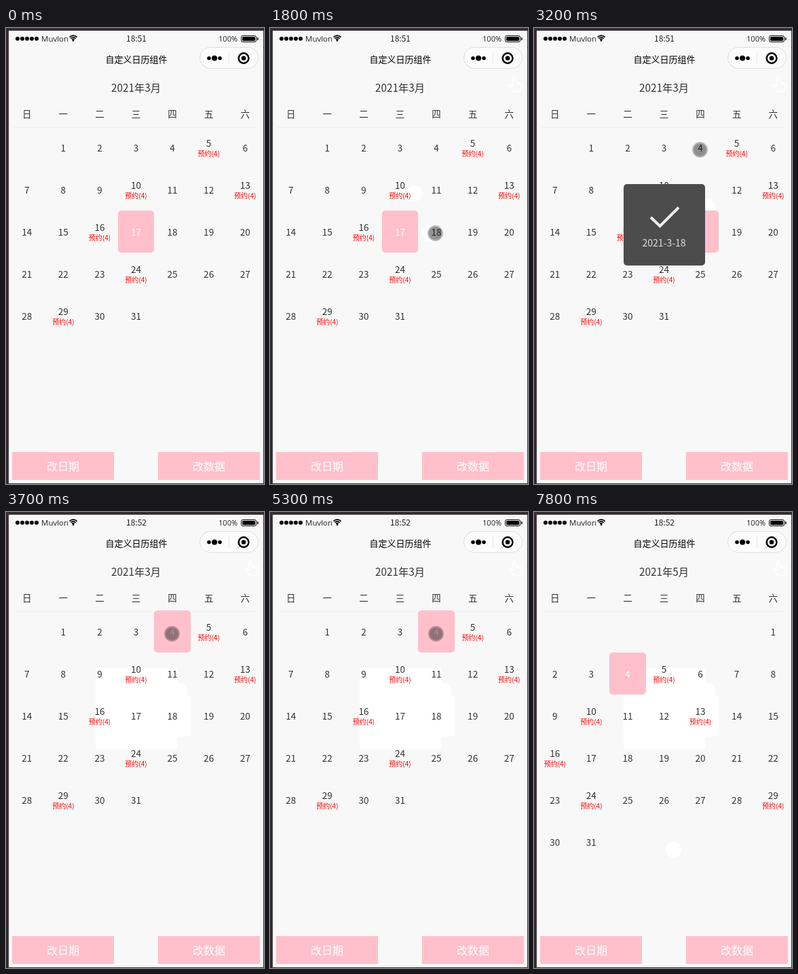
Recreate the animation shown at these times as an HTML page with a canvas. Size 380 by 672 pixels, loop 8000 ms.

```html
<!DOCTYPE html>
<html lang="zh">
<head>
<meta charset="utf-8">
<title>日历组件</title>
<style>
html, body { margin: 0; width: 100%; height: 100%; overflow: hidden; background: #f8f8f8; }
canvas { display: block; }
</style>
</head>
<body>
<canvas id="stage" width="380" height="672"></canvas>
<script>
const c = document.getElementById('stage').getContext('2d');
const LOOP = 8000, PINK = '#ffc0cb', PAGE = '#f8f8f8';
const CJK = '"Noto Sans CJK SC", "Noto Sans CJK", sans-serif';
const LATIN = '"Open Sans", ' + CJK;
const BOOKED = [5, 10, 13, 16, 24, 29];
const COL = 375 / 7, ROW = 62, TOP = 145;

// Touch pointer: [time, x, y]; without a place it is hidden
const POINTER = [
  [0], [400, 213.5, 243.5], [500, 199, 282], [700, 198.5, 285], [1000, 198.5, 288.5],
  [1200, 196, 296], [1300, 193.5, 303.5], [1400],
  [1600, 235.5, 302.5], [1700, 239.5, 302.5], [1800, 243.5, 302.5],
  [2000, 245.5, 309.5], [2600, 248, 298], [2700, 252, 280], [2800, 255.5, 263.5], [2900],
  [3200, 244.5, 179.5], [5500], [5700, 205.5, 497.5], [5800],
  [6100, 84.5, 642.5], [6200, 83.5, 644.5], [7800]
];

function text(s, x, y, size, color, font = CJK, align = 'center', weight = 400) {
  c.font = `${weight} ${size}px ${font}`;
  c.textAlign = align;
  c.fillStyle = color;
  c.fillText(s, x, y);
}

function rect(x, y, w, h, color, r = 0) {
  c.fillStyle = color;
  c.beginPath();
  c.roundRect(x, y, w, h, r);
  c.fill();
}

function cell(i, y, color) {
  const left = Math.round(4 + i * COL), right = Math.round(4 + (i + 1) * COL);
  rect(left, y, right - left, ROW, color, 5);
}

function disc(x, y, r, color) {
  c.fillStyle = color;
  c.beginPath();
  c.arc(x, y, r, 0, 7);
  c.fill();
}

function arc(x, y, r, color, width, from = 0, to = 2 * Math.PI) {
  c.strokeStyle = color;
  c.lineWidth = width;
  c.beginPath();
  c.arc(x, y, r, from, to);
  c.stroke();
}

function header(t) {
  for (let i = 0; i < 5; i++) disc(17 + i * 7, 15.7, 3, '#000');
  text('Muvlon', 52, 19.5, 11.5, '#222', LATIN, 'left');
  for (const r of [2.6, 5.2, 7.8]) arc(99, 19, r, '#000', 1.7, -2.36, -0.78);
  disc(99, 18.6, 1.3, '#000');
  text(t < 3400 ? '18:51' : '18:52', 192, 19.5, 12, '#222');
  text('100%', 341, 20, 11, '#222', LATIN, 'right');
  c.strokeStyle = '#000';
  c.lineWidth = 1;
  c.beginPath();
  c.roundRect(346.5, 11.5, 22, 9, 2);
  c.stroke();
  rect(348, 13, 19, 6, '#000', 1);
  rect(370, 14, 1.5, 4, '#000');

  text('自定义日历组件', 192, 51, 13, '#000');
  rect(285.5, 28.5, 86, 31, 'rgba(255,255,255,.6)', 15.5);
  c.strokeStyle = '#dedede';
  c.lineWidth = 1;
  c.stroke();
  disc(299, 44.5, 2.8, '#000');
  disc(307, 44.5, 4, '#000');
  disc(315, 44.5, 2.8, '#000');
  rect(328, 35, 1, 18, '#e8e8e8');
  arc(350, 44.5, 7.4, '#000', 2.5);
  disc(350, 44.5, 3.3, '#000');
}

// White patches left behind after things vanish
function patches(t) {
  if (t >= 500) disc(213.5, 243.5, 11.5, '#fff');
  if (t >= 1700) disc(235.5, 302.5, 11.5, '#fff');
  if (t >= 2900) disc(255.5, 263.5, 11.5, '#fff');
  if (t >= 3400) rect(132, 230, 120, 120, '#fff', 1);
  if (t >= 3700) cell(4, 269, '#fff');
  if (t >= 5800) disc(205.5, 497.5, 11.5, '#fff');
}

function hand(t) {
  if (t < 300) return;
  c.beginPath();
  c.moveTo(358, 87);
  c.lineTo(358, 72);
  c.quadraticCurveTo(359.5, 69, 361.5, 72);
  c.lineTo(361.5, 79);
  c.lineTo(368, 80.5);
  c.quadraticCurveTo(370, 81, 370, 83);
  c.lineTo(370, 88);
  c.lineTo(368, 94);
  c.lineTo(359, 94);
  c.lineTo(353, 85);
  c.quadraticCurveTo(353, 82, 358, 86);
  c.moveTo(364.5, 80);
  c.lineTo(364.5, 84);
  c.moveTo(367.5, 81);
  c.lineTo(367.5, 84);
  const live = t < 400;
  c.fillStyle = live ? '#fff' : PAGE;
  c.fill();
  c.strokeStyle = live ? '#000' : '#fff';
  c.lineWidth = live ? 1 : 1.7;
  c.stroke();
}

function calendar(t) {
  const may = t >= 7100;
  const first = may ? 6 : 1;
  const picked = t < 2000 ? 17 : t < 3700 ? 18 : 4;
  text(`2021年${may ? 5 : 3}月`, 191.5, 94, 15.3, '#333');
  [...'日一二三四五六'].forEach((s, i) => text(s, 4 + (i + .5) * COL, 132, 13.5, '#333'));
  rect(9, 146, 360, 1, '#f0f0f0');
  for (let day = 1; day <= 31; day++) {
    const i = day - 1 + first, col = i % 7;
    const x = 4 + (col + .5) * COL;
    const y = TOP + Math.floor(i / 7) * ROW;
    const on = day === picked, booked = BOOKED.includes(day);
    if (on) cell(col, y, PINK);
    text(day, x, y + (booked ? 30 : 37), 13.6, on ? '#fff' : '#333');
    if (booked) text('预约(4)', x, y + 44, 10, '#f00');
  }
}

function button(x, label) {
  rect(x, 625, 150, 41, PINK);
  text(label, x + 75, 652, 16, '#fff');
}

function toast(t) {
  const second = t >= 3800;
  if (!(t >= 2000 && t < 3400) && !(second && t < 5300)) return;
  c.globalAlpha = second && t < 3900 ? .5 : 1;
  rect(132, 230, 120, 120, '#4c4c4c', 5);
  c.strokeStyle = '#eee';
  c.lineWidth = 4;
  c.beginPath();
  c.moveTo(172, 279);
  c.lineTo(185.5, 292);
  c.lineTo(213, 264.5);
  c.stroke();
  text(second ? '2021-3-4' : '2021-3-18', 191.5, 322, 14, '#dedede', CJK, 'center', 500);
  c.globalAlpha = 1;
}

function pointer(t) {
  const [, x, y] = POINTER.filter(p => p[0] <= t).pop();
  if (x === undefined) return;
  disc(x, y, 9.5, 'rgba(20,20,20,.46)');
  arc(x, y, 10.4, 'rgba(20,20,20,.3)', 2);
}

function draw(now) {
  const t = now % LOOP;
  rect(0, 0, 380, 672, '#342e32');
  rect(4, 4, 375, 667, PAGE);
  patches(t);
  header(t);
  hand(t);
  calendar(t);
  button(9, '改日期');
  button(224, '改数据');
  toast(t);
  pointer(t);
}

const start = performance.now();
function tick() {
  draw(performance.now() - start);
  requestAnimationFrame(tick);
}
tick();
</script>
</body>
</html>
```
